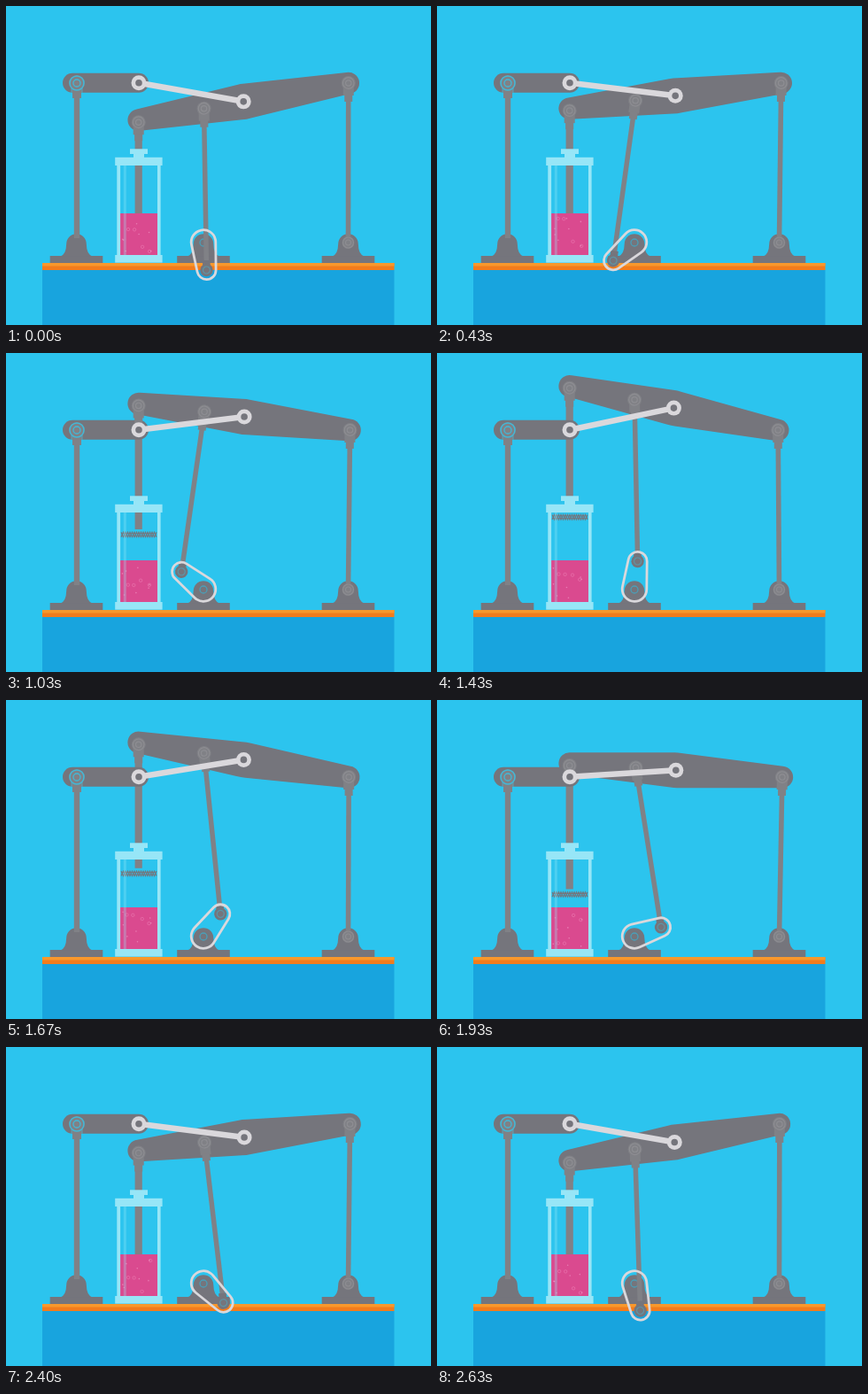
An HTML page with a canvas for the animation above (2660 ms loop, 480 px wide and 360 px high).

```html
<!DOCTYPE html>
<html lang="en">
<head>
<meta charset="utf-8">
<title>Beam engine</title>
<style>
  html, body { margin: 0; width: 100%; height: 100%; overflow: hidden; background: #2cc4ee; }
  canvas { display: block; width: 480px; height: 360px; }
</style>
</head>
<body>
<canvas id="stage" width="480" height="360"></canvas>
<script>
const ctx = document.getElementById('stage').getContext('2d');
const LOOP = 2660;
const SKY = '#2cc4ee', STEEL = '#75757c', ROD = '#808186', RIM = '#8d8d92';
const PALE = '#dad8dc', GLASS = '#97e6f7', LIQUID = '#da4a8f';

// Linkage geometry
const HUB = { x: 223, y: 266.5 }, CRANK = 31.7, ROD_LEN = 182.3;
const BEAM_X = 149.7, BEAM_LEN = 240.7, JOINT = 0.3115;
const FOOT = { x: 386.5, y: 267 }, POST = 180;

// Crank turn: [step, degrees from straight down]
const TURN = [[1, -6.3], [13, 49], [17, 66], [31, 128.5], [43, 186.5], [50, 217.5], [65, 281], [79, 348]];

const lerp = (a, b, k) => a + (b - a) * k;
const mix = (p, q, k) => ({ x: lerp(p.x, q.x, k), y: lerp(p.y, q.y, k) });

function crankAngle(step) {
  let i = 1;
  while (i < TURN.length - 1 && TURN[i][0] < step) i++;
  const [s0, a0] = TURN[i - 1], [s1, a1] = TURN[i];
  return lerp(a0, a1, (step - s0) / (s1 - s0)) * Math.PI / 180;
}

function solve(angle) {
  const pin = { x: HUB.x - CRANK * Math.sin(angle), y: HUB.y + CRANK * Math.cos(angle) };
  const left = { x: BEAM_X, y: 85 }, right = { x: 388, y: 87 };
  let joint = mix(left, right, JOINT);
  for (let i = 0; i < 8; i++) {
    const jy = pin.y - Math.sqrt(ROD_LEN ** 2 - (pin.x - joint.x) ** 2);
    left.y = (jy - JOINT * right.y) / (1 - JOINT);
    right.x = left.x + Math.sqrt(BEAM_LEN ** 2 - (left.y - right.y) ** 2);
    right.y = FOOT.y - Math.sqrt(POST ** 2 - (right.x - FOOT.x) ** 2);
    joint = mix(left, right, JOINT);
  }
  return { pin, left, right, joint, mid: mix(left, right, 0.5) };
}

function rect(x, y, w, h, color) {
  ctx.fillStyle = color;
  ctx.fillRect(x, y, w, h);
}

function disc(x, y, r, color) {
  ctx.fillStyle = color;
  ctx.beginPath();
  ctx.arc(x, y, r, 0, 7);
  ctx.fill();
}

function ring(x, y, r, color, width) {
  ctx.strokeStyle = color;
  ctx.lineWidth = width;
  ctx.beginPath();
  ctx.arc(x, y, r, 0, 7);
  ctx.stroke();
}

function bar(p, q, width, color, cap = 'butt') {
  ctx.strokeStyle = color;
  ctx.lineWidth = width;
  ctx.lineCap = cap;
  ctx.beginPath();
  ctx.moveTo(p.x, p.y);
  ctx.lineTo(q.x, q.y);
  ctx.stroke();
}

// Draws in a frame whose origin is p and whose x axis points to q
function along(p, q, draw) {
  ctx.save();
  ctx.translate(p.x, p.y);
  ctx.rotate(Math.atan2(q.y - p.y, q.x - p.x));
  draw(Math.hypot(q.x - p.x, q.y - p.y));
  ctx.restore();
}

function clevis(p, q, rim = RIM) {
  along(p, q, () => {
    disc(0, 0, 8, ROD);
    rect(0, -6, 14, 12, ROD);
    rect(13, -4.5, 8, 9, ROD);
    ring(0, 0, 6.3, rim, 1.2);
    ring(0, 0, 3.2, rim, 1.2);
  });
}

function base(x) {
  rect(x - 29.8, 282, 59.6, 8, STEEL);
  ctx.fillStyle = STEEL;
  ctx.beginPath();
  ctx.moveTo(x - 18, 282.5);
  ctx.quadraticCurveTo(x - 11.5, 280, x - 11.3, 268.5);
  ctx.arc(x, 268.5, 11.3, Math.PI, 0);
  ctx.quadraticCurveTo(x + 11.5, 280, x + 18, 282.5);
  ctx.fill();
}

function table() {
  rect(0, 0, 480, 360, SKY);
  rect(41, 298, 397.5, 62, '#18a4de');
  rect(41, 290, 397.5, 8, '#f27c1c');
  rect(41, 290, 397.5, 3.5, '#f8982c');
}

function beam(p, q) {
  along(p, q, len => {
    const r = 12.3;
    ctx.fillStyle = STEEL;
    ctx.beginPath();
    ctx.arc(0, 0, r, Math.PI / 2, Math.PI * 1.5);
    ctx.lineTo(len / 2 - 5, -19.7);
    ctx.quadraticCurveTo(len / 2, -20.3, len / 2 + 5, -19.7);
    ctx.arc(len, 0, r, -Math.PI / 2, Math.PI / 2);
    ctx.lineTo(len / 2 + 5, 19.7);
    ctx.quadraticCurveTo(len / 2, 20.3, len / 2 - 5, 19.7);
    ctx.fill();
  });
}

function crankLoop(pin) {
  along(HUB, pin, len => {
    const r0 = 13.8, r1 = 10.6, a = Math.acos((r0 - r1) / len);
    ctx.strokeStyle = PALE;
    ctx.lineWidth = 2.8;
    ctx.beginPath();
    ctx.arc(0, 0, r0, a, -a);
    ctx.arc(len, 0, r1, -a, a);
    ctx.closePath();
    ctx.stroke();
  });
}

function piston(y) {
  rect(145.6, y + 10, 8.2, 132, ROD);
  ctx.strokeStyle = STEEL;
  ctx.lineWidth = 1.1;
  for (const side of [-1, 1]) {
    ctx.beginPath();
    for (let i = 0; i <= 16; i++) {
      ctx.lineTo(130 + i * 2.5, y + 148 + (i % 2 ? side : -side) * 2.8);
    }
    ctx.stroke();
  }
}

const rand = n => {
  const v = Math.sin(n * 127.1 + 3.7) * 43758.5453;
  return v - Math.floor(v);
};

function liquid(k) {
  rect(129, 234, 42.3, 47.5, LIQUID);
  ctx.save();
  ctx.globalAlpha = 0.55;
  for (let i = 0; i < 11; i++) {
    const rise = (rand(i) + k * (1 + i % 2)) % 1;
    const x = 132 + rand(i + 40) * 36 + Math.sin(rise * 9 + i);
    const y = 278 - rise * 40;
    if (i % 3) disc(x, y, 0.8, '#f6a6cf');
    else ring(x, y, 1.7, '#f08cbe', 0.8);
  }
  ctx.restore();
}

function cylinder() {
  ctx.globalAlpha = 0.3;
  rect(132.8, 180, 3, 101, GLASS);
  ctx.globalAlpha = 1;
  rect(125.3, 178, 3.8, 105, GLASS);
  rect(171, 178, 3.6, 105, GLASS);
  rect(140, 161.3, 20, 5.7, GLASS);
  rect(144, 166.5, 12, 5, GLASS);
  rect(123.2, 170.8, 53.4, 9.2, GLASS);
  rect(123.2, 281, 53.4, 8.6, GLASS);
}

function leftPost() {
  bar({ x: 75, y: 86.8 }, { x: 150, y: 86.8 }, 22, STEEL, 'round');
  bar({ x: 80, y: 100 }, { x: 80, y: 262 }, 6.4, ROD);
  rect(74, 92, 12, 6, ROD);
  rect(75, 97, 10, 7, ROD);
  disc(80, 87, 9, ROD);
  ring(80, 87, 8, '#41b9d8', 1.5);
  ring(80, 87, 4, '#41b9d8', 1.3);
  ctx.strokeStyle = '#4fafc8';
  ctx.lineWidth = 0.8;
  ctx.beginPath();
  ctx.moveTo(74, 93);
  ctx.lineTo(74, 98);
  ctx.moveTo(86, 93);
  ctx.lineTo(86, 98);
  ctx.stroke();
}

function link(p, q) {
  bar(p, q, 6.6, PALE);
  for (const e of [p, q]) {
    disc(e.x, e.y, 8.5, PALE);
    disc(e.x, e.y, 3.8, STEEL);
  }
}

function draw(step) {
  const { pin, left, right, joint, mid } = solve(crankAngle(step));
  const hang = { x: left.x, y: left.y + 2.5 };

  table();
  for (const x of [79.5, HUB.x, FOOT.x]) base(x);
  ring(HUB.x, HUB.y + 0.5, 4, '#4a9fb8', 1.3);

  piston(left.y);
  liquid(step / 79);
  cylinder();

  leftPost();
  beam(left, right);
  clevis(hang, { x: hang.x, y: 300 });

  bar(mix(right, FOOT, 0.07), FOOT, 5.6, ROD);
  clevis(right, FOOT);
  disc(FOOT.x, FOOT.y, 7, ROD);
  ring(FOOT.x, FOOT.y, 6, RIM, 1.1);
  ring(FOOT.x, FOOT.y, 3, RIM, 1.1);

  bar(joint, pin, 5.5, ROD);
  clevis(joint, pin);
  along(pin, joint, () => {
    rect(0, -4.3, 11, 8.6, STEEL);
    disc(0, 0, 7.2, STEEL);
    ring(0, 0, 4, '#5d95a6', 1.2);
  });
  crankLoop(pin);
  link({ x: 150, y: 86.8 }, mid);
}

// Thirty steps a second; the first pose is held for two
function tick() {
  const t = performance.now() % LOOP;
  draw(Math.min(79, Math.max(1, Math.floor((t + 4) * 0.03))));
  requestAnimationFrame(tick);
}
tick();
</script>
</body>
</html>
```
